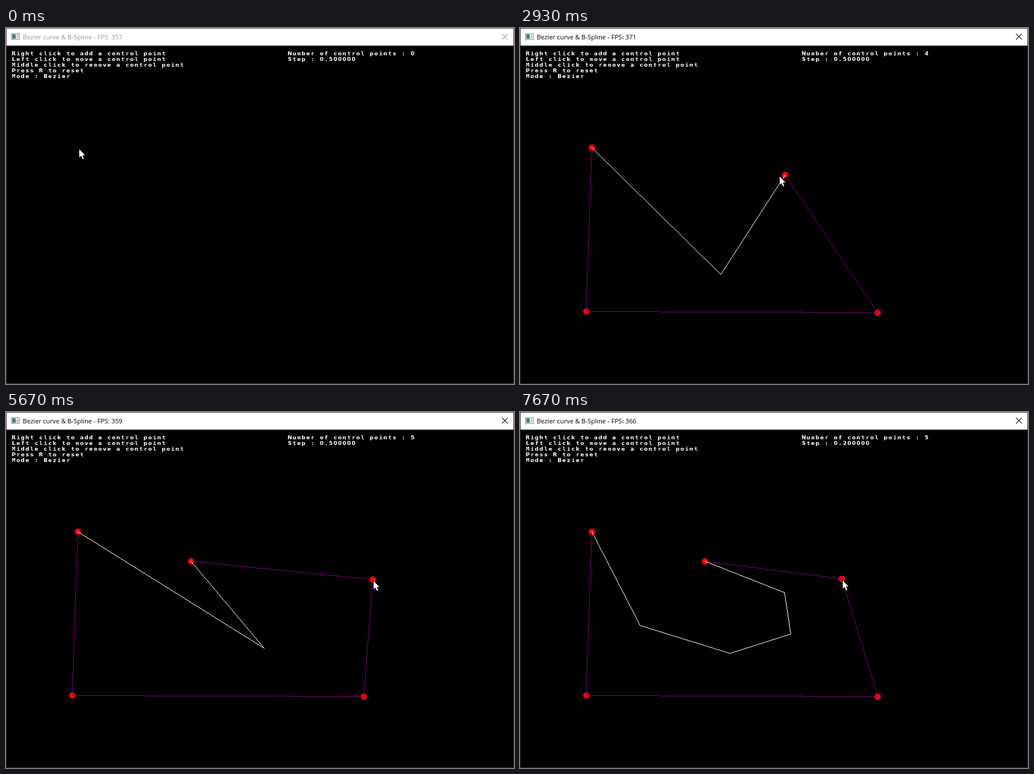
These frames come from a looping animation (894 px wide and 626 px high, 8 s). An HTML page with a canvas:

```html
<!DOCTYPE html>
<html lang="en">
<head>
<meta charset="utf-8">
<title>Bezier curve</title>
<style>
  html, body { margin: 0; width: 100%; height: 100%; overflow: hidden; background: #000; }
  canvas, svg { position: absolute; left: 0; top: 0; width: 894px; height: 626px; }
  #title { font: 11.3px "Open Sans", "Noto Sans", sans-serif; }
  #console text { font: bold 9.5px "DejaVu Sans", sans-serif; fill: #fff; text-anchor: middle; }
  #console .narrow { font-family: "DejaVu Sans Mono", monospace; }
</style>
</head>
<body>
<canvas id="view" width="894" height="626"></canvas>
<svg viewBox="0 0 894 626">
  <rect id="frame" x=".5" y=".5" width="893" height="625" fill="none"/>
  <rect x="1" y="1" width="892" height="30" fill="#fff"/>
  <g shape-rendering="crispEdges">
    <rect x="9" y="9" width="15" height="12" fill="#8b9096"/>
    <rect x="10" y="10" width="13" height="10" fill="#f4f6f7"/>
    <rect x="11" y="11" width="6" height="8" fill="#3f807c"/>
    <rect x="18" y="11" width="4" height="8" fill="#c9d0d6"/>
  </g>
  <text id="title" x="29.5" y="20"></text>
  <path id="close" d="M873 10.2l10 10m0-10l-10 10" fill="none" stroke-width="1.1"/>
  <g id="console"></g>
  <path id="cursor" d="M2 2.2V16.8L5.2 13.6 7.8 19.6 10 18.7 7.5 12.8H12Z"
    fill="#fff" stroke="#000" stroke-width="1.6" paint-order="stroke"/>
</svg>
<script>
const LOOP = 8000, TICK = 200 / 3;
const $ = id => document.getElementById(id);
const ctx = $('view').getContext('2d');

// Mouse moves: start tick, end tick, target x, y, sideways bow
const HOME = [127, 211];
const MOVES = [
  [0, 1, 126, 211, 0],
  [7, 18, 116, 499, 12],
  [21, 26, 629, 501, 0],
  [33, 39, 466, 259, 0],
  [43, 47.5, 325, 263, 0],
  [55, 64, 481, 256, 105],
  [66, 68, 473, 259, 0],
  [72, 85, 645, 295, -15],
  [85, 93, 534, 306, -14],
  [93, 99.7, 566, 294, 0]
];
const CLICKS = [4, 20, 30, 41, 51];
const DRAG_START = 73, DRAGGED = 3;
const FPS = [357, 364, 369, 371, 362, 359, 359, 363, 366];

const ease = t => t * t * t * (10 - 15 * t + 6 * t * t);
const stepAt = k => k < 114 ? 0.5 : k < 115 ? 0.3 : 0.2;

function mouseAt(k) {
  let [x, y] = HOME;
  for (const [from, to, tx, ty, bow] of MOVES) {
    if (k < from) break;
    const e = ease(Math.min(1, (k - from) / (to - from)));
    const dx = tx - x, dy = ty - y;
    const side = 4 * e * (1 - e) * bow / Math.hypot(dx, dy);
    x += dx * e - dy * side;
    y += dy * e + dx * side;
  }
  return [Math.round(x), Math.round(y)];
}

// Control points land one pixel above the mouse
function pointAt(k) {
  const [x, y] = mouseAt(k);
  return [x, y - 1];
}

// De Casteljau
function bezier(pts, t) {
  while (pts.length > 1)
    pts = pts.slice(1).map((p, i) => p.map((v, a) => pts[i][a] * (1 - t) + v * t));
  return pts[0];
}

function curve(pts, step) {
  const out = [];
  for (let t = 0; t < 1 - 1e-6; t += step) out.push(bezier(pts, t));
  return [...out, pts[pts.length - 1]];
}

// Hard-edged one pixel polyline
function polyline(pts, color) {
  ctx.fillStyle = color;
  for (let i = 1; i < pts.length; i++) {
    const [x0, y0] = pts[i - 1].map(Math.round), [x1, y1] = pts[i].map(Math.round);
    const n = Math.max(Math.abs(x1 - x0), Math.abs(y1 - y0), 1);
    for (let j = 0; j <= n; j++)
      ctx.fillRect(Math.round(x0 + (x1 - x0) * j / n), Math.round(y0 + (y1 - y0) * j / n), 1, 1);
  }
}

// Hard-edged disc, 11px across
function dot([x, y]) {
  ctx.fillStyle = '#f00';
  for (let dy = -5; dy <= 5; dy++) {
    const w = Math.floor(Math.sqrt(30 - dy * dy));
    ctx.fillRect(x - w, y + dy, 2 * w + 1, 1);
  }
}

// Console text sits on a grid of 8px cells
function consoleLine(x, y) {
  const el = document.createElementNS('http://www.w3.org/2000/svg', 'text');
  el.setAttribute('y', y);
  $('console').append(el);
  return s => {
    el.setAttribute('x', [...s].map((c, i) => x + 3.5 + i * 8).join(' '));
    el.innerHTML = s.replace(/[iltrmM]+/g, '<tspan class="narrow">$&</tspan>');
  };
}

['Right click to add a control point', 'Left click to move a control point',
 'Middle click to remove a control point', 'Press R to reset', 'Mode : Bezier']
  .forEach((s, i) => consoleLine(10, 48 + i * 10)(s));
const setCount = consoleLine(496, 48), setStep = consoleLine(496, 58);

function draw(k) {
  const active = k >= CLICKS[0];
  const step = stepAt(k);
  const pts = CLICKS.filter(c => c <= k).map(pointAt);
  if (k >= DRAG_START) pts[DRAGGED] = pointAt(k);

  ctx.fillStyle = '#000';
  ctx.fillRect(0, 0, 894, 626);
  pts.forEach(dot);
  polyline(pts, '#800080');
  if (pts.length > 1) polyline(curve(pts, step), '#fff');

  setCount('Number of control points : ' + pts.length);
  setStep('Step : ' + step.toFixed(6));
  // The frame rate is refreshed once a second
  $('title').textContent = 'Bezier curve & B-Spline - FPS: ' + FPS[Math.floor((k + 5) / 15)];
  $('title').setAttribute('fill', active ? '#000' : '#999');
  $('close').setAttribute('stroke', active ? '#000' : '#999');
  $('frame').setAttribute('stroke', active ? '#303030' : '#484848');
  $('cursor').setAttribute('transform', `translate(${mouseAt(k)})`);
}

const start = performance.now();
let shown = -1;
function loop() {
  const t = (performance.now() - start) % LOOP;
  const k = Math.floor((t + 3.4) / TICK) % Math.round(LOOP / TICK);
  if (k !== shown) draw(shown = k);
  requestAnimationFrame(loop);
}
loop();
</script>
</body>
</html>
```
